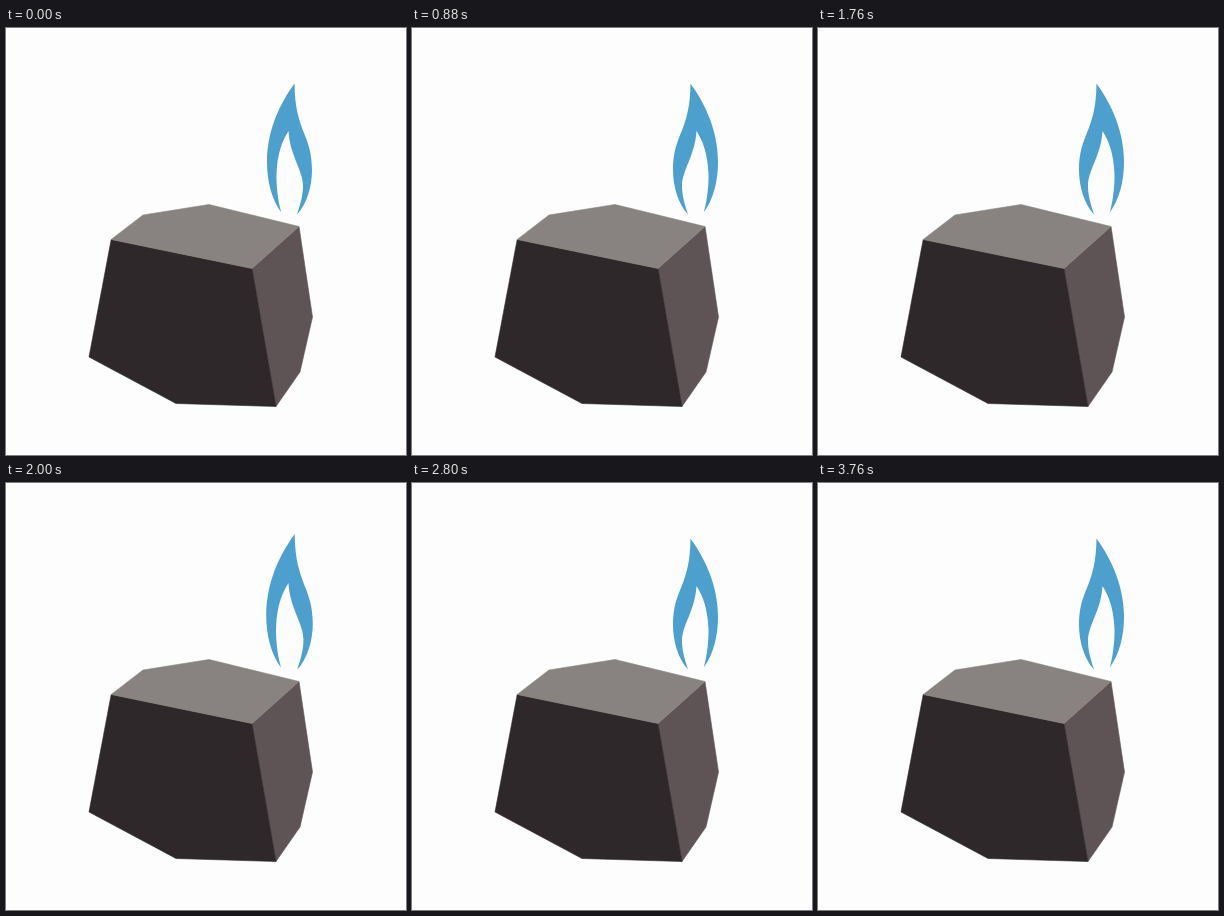
These frames come from a looping animation (400x427 px, 3.84 s). An HTML page:

```html
<!DOCTYPE html>
<html lang="en">
<head>
<meta charset="utf-8">
<title>Burning rock</title>
<style>
  html, body { margin: 0; width: 100%; height: 100%; overflow: hidden; background: #fdfdfd; }
  svg { display: block; width: 400px; height: 427px; }
  .face { fill: currentColor; stroke: currentColor; stroke-width: .6; stroke-linejoin: round; }
</style>
</head>
<body>
<svg viewBox="0 0 400 427">
  <path class="face" color="#5e5456" d="M293 198.5 306.5 289 294 344 270 378.5 246 240.5Z"/>
  <path class="face" color="#2e282a" d="M105.2 211.5 246 240.5 270 378.5 170 375.5 83 329Z"/>
  <path class="face" color="#888380" d="M203 176.5 293 198.5 246 240.5 105.2 211.5 137 187Z"/>
  <path id="flame" fill="#4d9fcd" d="M288.5 55.5C278 70 261 98 261 134C261 154 266 172 275.3 184.5
    C271.5 172 270 154 270.6 144C271.5 126 276 113 282.5 103C284 128 297 142 297 158C297 168 294 177 291 186.5
    C301 176 306 158 306 142C306 106 289 104 288.5 55.5Z"/>
</svg>
<script>
  const flame = document.getElementById('flame');
  const STEP = 80, PUFF_STEPS = 6, PUFFS = 8;
  const PIVOT = { x: 283.5, y: 186 };

  function draw(now) {
    const step = Math.floor(now / STEP);
    const puff = Math.floor(step / PUFF_STEPS) % PUFFS;
    const phase = step % PUFF_STEPS;

    // Each puff leans the other way, swells and rests; its strength varies over the loop
    const side = puff % 2 ? -1 : 1;
    const strength = 0.125 + 0.075 * Math.cos(2 * Math.PI * 3 * puff / PUFFS);
    const scale = 1 + strength * Math.max(0, Math.sin(Math.PI * phase / 4));

    flame.setAttribute('transform',
      `translate(${PIVOT.x} ${PIVOT.y}) scale(${side * scale} ${scale}) translate(${-PIVOT.x} ${-PIVOT.y})`);
  }

  const start = performance.now();
  function tick() {
    draw(performance.now() - start);
    requestAnimationFrame(tick);
  }
  tick();
</script>
</body>
</html>
```
